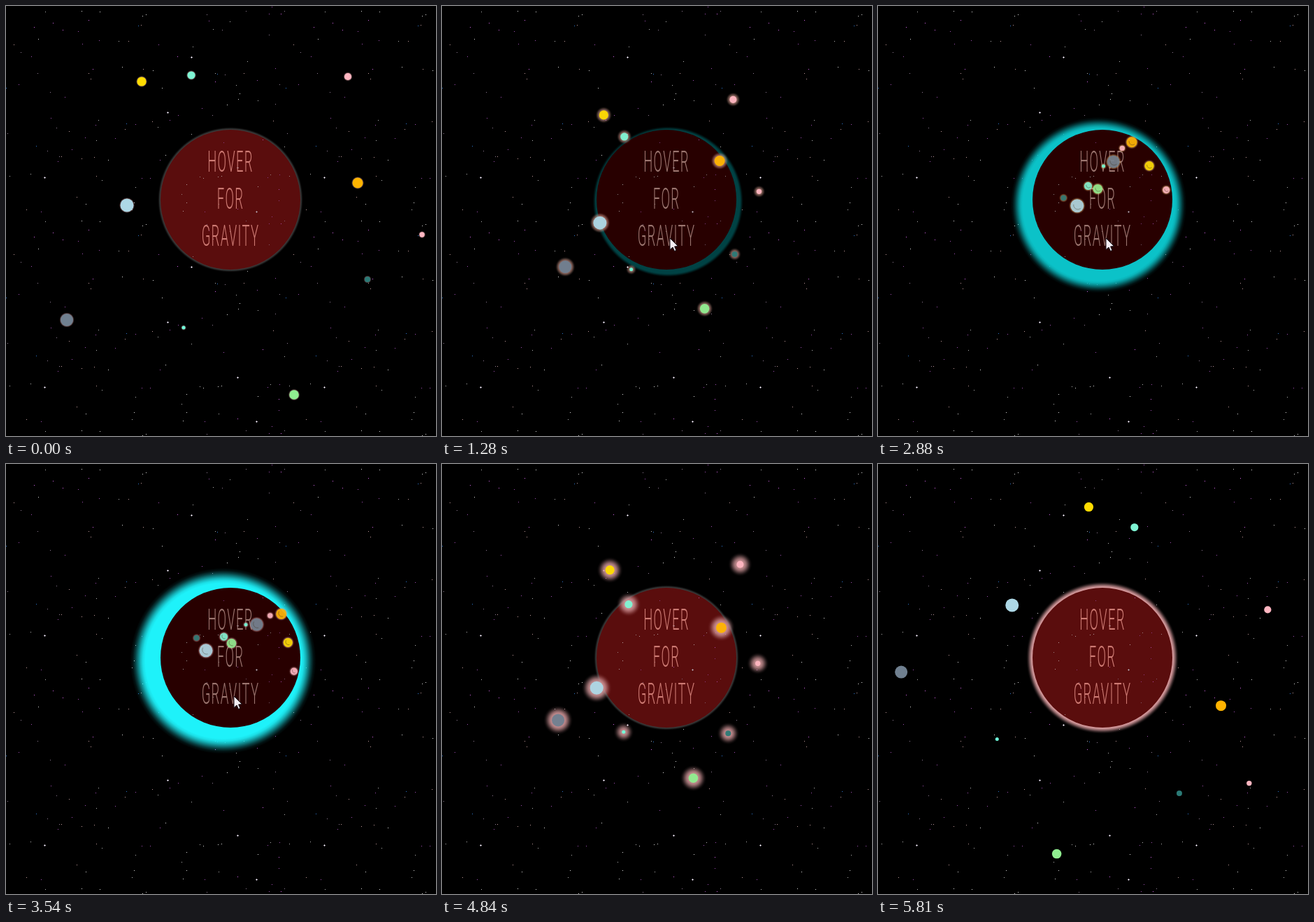
Animation, 615 px wide and 615 px high, one loop 5.88 s. Source, as an HTML page with a canvas:

```html
<!DOCTYPE html>
<html lang="en">
<head>
<meta charset="utf-8">
<title>Hover for gravity</title>
<style>
  html, body { margin: 0; width: 100%; height: 100%; overflow: hidden; background: #000; }
  canvas { display: block; width: 615px; height: 615px; }
</style>
</head>
<body>
<canvas id="stage" width="615" height="615" aria-label="Hover for gravity"></canvas>
<script>
const SIZE = 615, LOOP = 5880;
const ENTER = 655, LEAVE = 4085, PULL = 1380;   // hover span and pull duration, ms
const SUN = { x: 321, y: 277, r: 100 };
const HUB = { x: 331, y: 277 };
const PINK = [215, 155, 158], YELLOW = [255, 225, 0], GRAY = [60, 60, 60];
const ctx = document.getElementById('stage').getContext('2d');

// free and gathered places around the hub, bob depth, radius, colour
const planet = (free, near, bob, r, color) => ({ free, near, bob, r, color });
const planets = [
  planet([-244, 172], [-40, -40], 9, 9, 'slategray'),
  planet([-158, 8], [-24, 40], 24, 9.5, 'lightblue'),
  planet([81, 279], [-24, 2], 16, 6.8, 'lightgreen'),
  planet([172, -24], [-45, -78], 8, 7.5, '#ffb400'),
  planet([-137, -169], [-3, -76], 5, 6.6, '#ffdc00'),
  planet([-66, -178], [-36, 10], 24, 5.6, '#7ff5d4'),
  planet([158, -176], [39, -73], 2, 5.1, 'lightpink'),
  planet([264, 50], [-47, -62], 11, 3.7, 'lightpink'),
  planet([186, 114], [-45, 48], 28, 4, '#2b7a76'),
  planet([-77, 183], [-44, -25], 15, 2.5, '#6fffdc')
];

const clamp = v => Math.max(0, Math.min(1, v));
const smooth = v => { v = clamp(v); return v * v * (3 - 2 * v); };
const mix = (a, b, k) => a + (b - a) * k;
const blend = (a, b, k) => a.map((v, i) => mix(v, b[i], k));
const rgba = (c, a = 1) => `rgba(${c.map(Math.round).join()},${a})`;
const hovered = t => t >= ENTER && t < LEAVE;

// 0 = free, 1 = hovered, eased over ms
function hover(t, ms) {
  return t < LEAVE ? smooth((t - ENTER) / ms) : 1 - smooth((t - LEAVE) / ms);
}

// The spin starts over whenever the hover state changes.
function angle(t) {
  const deg = t < ENTER ? t * 0.033
    : t < LEAVE ? -28 + (t - ENTER) * 0.0354
    : -25.7 + (t - LEAVE) * 0.033;
  return deg * Math.PI / 180;
}

function disc(x, y, r, fill) {
  ctx.fillStyle = fill;
  ctx.beginPath();
  ctx.arc(x, y, r, 0, Math.PI * 2);
  ctx.fill();
}

function halo(x, y, r, width, color, alpha = 1) {
  if (width < 0.3) return;
  const g = ctx.createRadialGradient(x, y, r, x, y, r + width);
  for (let i = 0; i <= 6; i++) g.addColorStop(i / 6, rgba(color, alpha * (1 - smooth(i / 6))));
  disc(x, y, r + width, g);
}

// The sky is one 400 x 300 tile, repeated.
function makeSky() {
  const sky = document.createElement('canvas');
  sky.width = sky.height = SIZE;
  const c = sky.getContext('2d');
  let seed = 41;
  const rnd = n => Math.floor((seed = (seed * 16807) % 2147483647) / 2147483647 * n);
  const dot = (x, y, color, w = 1, h = 1) => {
    c.fillStyle = color;
    for (let px = x; px < SIZE; px += 400)
      for (let py = y; py < SIZE; py += 300) c.fillRect(px, py, w, h);
  };
  const tints = ['#dcdcdc', '#b4b4b4', '#d264e6', '#907c94', '#c09a9a', '#a050b4'];
  for (let i = 0; i < 125; i++) {
    dot(rnd(400), rnd(300), i % 30 ? tints[rnd(tints.length)] : '#2d78d2');
  }
  for (const [x, y] of [[55, 245], [265, 73], [231, 152], [331, 231], [358, 294]]) {
    dot(x - 1, y, '#a8a0b0', 3, 1);
    dot(x, y - 1, '#a8a0b0', 1, 3);
    dot(x, y, '#ffffff');
  }
  return sky;
}
const sky = makeSky();

// Cyan shadow: grows and turns while hovered, then fades away.
function drawShadow(t) {
  const grow = clamp((Math.min(t, LEAVE) - ENTER) / 2885);
  const k = grow * (1 - smooth((t - LEAVE) / 650));
  if (k <= 0) return;
  const dir = Math.PI / 3 + 1.3 * angle(Math.min(t, LEAVE - 1));
  const shift = 11.5 * k ** 0.75;
  const x = SUN.x + Math.cos(dir) * shift, y = SUN.y + Math.sin(dir) * shift;
  const color = [30 * k ** 4, 242 * k ** 0.85, 250 * k ** 0.85];
  const edge = SUN.r + 11 * k;
  disc(x, y, edge, rgba(color));
  halo(x, y, edge, 22 * k ** 0.9, color);
}

function drawSun(t) {
  const { x, y, r } = SUN;
  drawShadow(t);
  if (!hovered(t)) {
    const ring = t < ENTER ? 4 * (1 - t / ENTER) : 9 * (t - LEAVE) / 1725;
    halo(x, y, r, ring, blend(GRAY, PINK, clamp((ring - 4) / 5)));
  }
  const dark = hover(t, 500);
  disc(x, y, r, rgba(blend([90, 13, 13], [40, 0, 0], dark)));
  ctx.save();
  ctx.globalAlpha = 0.7;
  ctx.beginPath();
  ctx.arc(x, y, r, 0, Math.PI * 2);
  ctx.clip();
  ctx.drawImage(sky, 0, 0);
  ctx.restore();
  drawWords(rgba(blend([205, 122, 115], [155, 118, 112], dark)));
}

function drawWords(color) {
  ctx.save();
  ctx.translate(SUN.x, 0);
  ctx.scale(0.44, 1);     // narrow face
  ctx.font = '300 42px Roboto, "Liberation Sans", sans-serif';
  ctx.letterSpacing = '3px';
  ctx.textAlign = 'center';
  ctx.fillStyle = color;
  ['HOVER', 'FOR', 'GRAVITY'].forEach((word, i) => ctx.fillText(word, 0, 237 + i * 53));
  ctx.restore();
}

function glowWidth(t) {
  if (hovered(t)) return 3 + 10 * Math.exp((ENTER - t) / 500);
  const age = t < ENTER ? t + 100 : t - LEAVE;
  return Math.max(0, 12.5 * Math.sin(Math.PI * age / 1650));
}

function drawPlanets(t) {
  const s = hover(t, PULL), drift = 4 * s * (1 - s);
  const a = angle(t), cos = Math.cos(a), sin = Math.sin(a);
  const glow = glowWidth(t);
  const drop = clamp((glow - 5) / 8);
  const color = blend(PINK, YELLOW, Math.exp(-(((t - 2240) / 600) ** 2)));
  for (const p of planets) {
    const [px, py] = blend(p.free, p.near, s);
    const lx = px - 7 * drift, ly = py - 3 * drift;
    const x = HUB.x + lx * cos - ly * sin - 3 * drop;
    const y = HUB.y + 2 * s + lx * sin + ly * cos + p.bob * drop;
    halo(x, y, p.r - 0.5, glow, color, 0.4 + 0.04 * glow);
    ctx.globalAlpha = mix(1, 0.88, s);
    disc(x, y, p.r, p.color);
    ctx.globalAlpha = 1;
    if (s > 0.6 && p.r > 5) {
      ctx.strokeStyle = rgba([60, 50, 30], 0.4 * s);
      ctx.lineWidth = 1;
      ctx.beginPath();
      ctx.arc(x + 1, y - 1, p.r * 0.65, a, a + 2.4);
      ctx.stroke();
    }
  }
}

function drawCursor(t) {
  if (t < 560 || t > LEAVE + 60) return;
  const away = Math.max(1 - (t - 560) / 340, (t - 3900) / 250, 0);
  ctx.save();
  ctx.translate(326 + 49 * away, 332 + 33 * away);
  ctx.beginPath();
  [[0, 0], [0, 16.5], [4, 13], [6.5, 18.5], [9, 17.5], [6.6, 12], [11.5, 11.5]]
    .forEach(p => ctx.lineTo(...p));
  ctx.closePath();
  ctx.fillStyle = '#f4eef4';
  ctx.fill();
  ctx.strokeStyle = '#181018';
  ctx.lineWidth = 1;
  ctx.stroke();
  ctx.restore();
}

function draw(t) {
  ctx.fillStyle = '#000';
  ctx.fillRect(0, 0, SIZE, SIZE);
  ctx.drawImage(sky, 0, 0);
  drawSun(t);
  drawPlanets(t);
  drawCursor(t);
}

let start;
function tick(now) {
  if (start === undefined) start = now;
  draw((now - start) % LOOP);
  requestAnimationFrame(tick);
}
draw(0);
requestAnimationFrame(tick);
</script>
</body>
</html>
```
